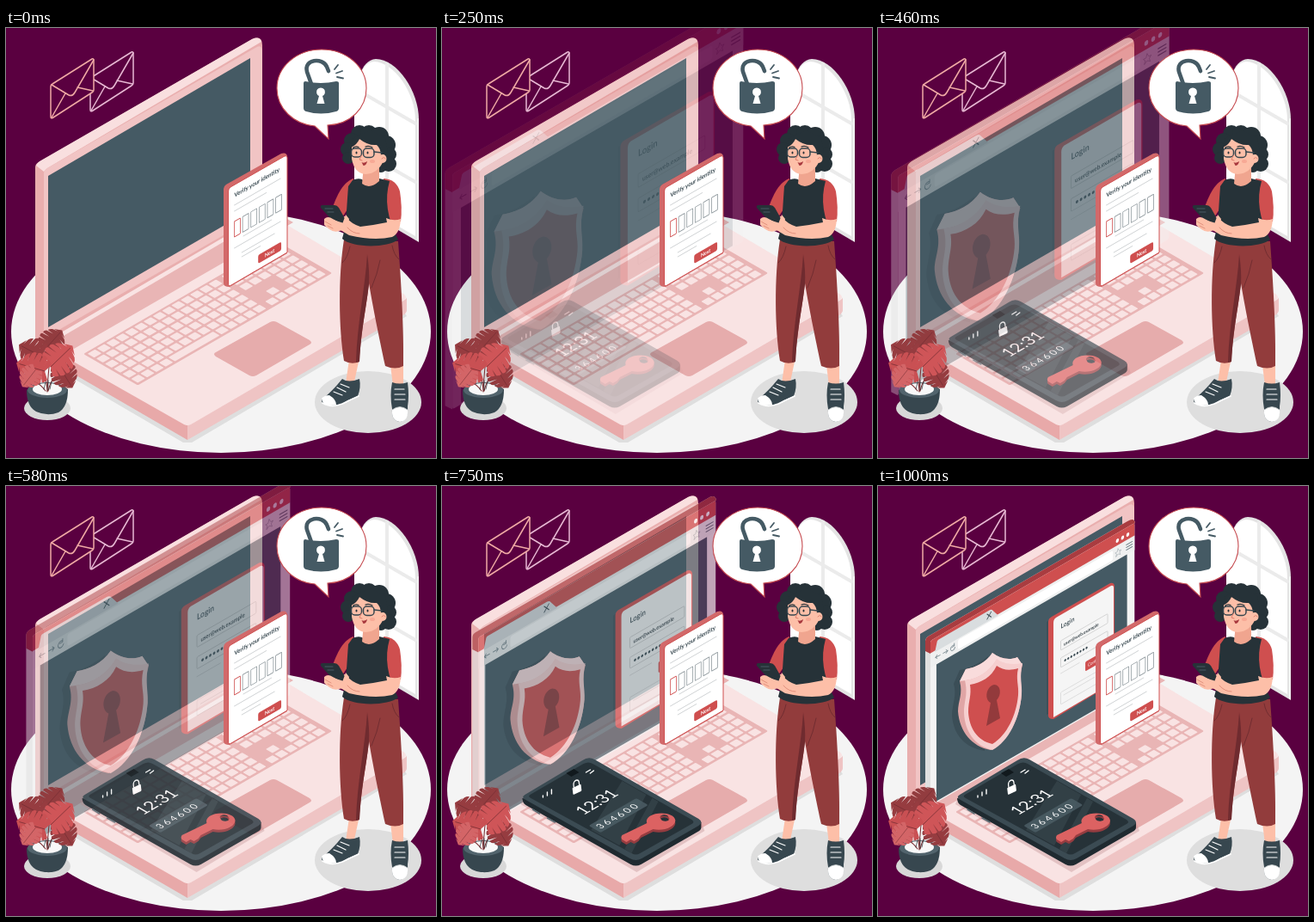
Recreate the animation shown at these times as an HTML page. Size 500 by 500 pixels, loop 1.04 s.

```html
<!DOCTYPE html>
<html lang="en">
<head>
<meta charset="utf-8">
<title>Verify your identity</title>
<style>
html, body { margin: 0; width: 100%; height: 100%; overflow: hidden; background: #5a0040; }
svg { display: block; width: 100%; height: 100%; }
text { font-family: "Lato", "Open Sans", sans-serif; }
</style>
</head>
<body>
<svg id="stage" viewBox="0 0 500 500"></svg>
<script>
const LOOP = 1040, STEP = 1000 / 24;
const DARK = '#263238', SLATE = '#455a64', STEEL = '#37474f', RED = '#cf4f4f', SKIN = '#fdbfa8';

const path = (d, fill, extra = '') => `<path d="${d}" fill="${fill}" ${extra}/>`;
const poly = (points, fill, extra = '') => `<polygon points="${points}" fill="${fill}" ${extra}/>`;
const line = (d, color, width = 1, extra = '') =>
  path(d, 'none', `stroke="${color}" stroke-width="${width}" stroke-linecap="round" stroke-linejoin="round" ${extra}`);
const oval = (x, y, rx, ry, fill, extra = '') =>
  `<ellipse cx="${x}" cy="${y}" rx="${rx}" ry="${ry}" fill="${fill}" ${extra}/>`;
const box = (x, y, w, h, r, fill, extra = '') =>
  `<rect x="${x}" y="${y}" width="${w}" height="${h}" rx="${r}" fill="${fill}" ${extra}/>`;
const label = (x, y, size, text, fill, extra = '') =>
  `<text x="${x}" y="${y}" font-size="${size}" fill="${fill}" ${extra}>${text}</text>`;

// Isometric planes: an upright wall and the flat table top.
const wall = (x, y, content) => `<g transform="matrix(.866 -.5 0 1 ${x} ${y})">${content}</g>`;
const flat = (x, y, content) => `<g transform="matrix(.866 -.5 .866 .5 ${x} ${y})">${content}</g>`;

function room() {
  return oval(250, 353, 244, 141, '#f4f4f4') +
    path('M405 205V105C405 66 412 37 430 36C455 36 480 74 480 106V249Z', '#e4e4e4') +
    path('M405 201V105C405 68 412 40 428 39C452 40 476 76 476 107V242Z', '#fff') +
    line('M443 42V226M405 70L476 111M405 138L476 179', '#ebebeb', 4, 'stroke-linecap="butt"') +
    line('M479 106V247', '#f2f2f2', 2) +
    oval(421, 435, 62, 36, '#dedede');
}

function envelopes() {
  const envelope = (x, y, color) => `<g transform="translate(${x} ${y})">` +
    line('M2 30L48 1Q50 0 50 3V37Q50 39 48 40L3 69Q0 71 0 68V33Q0 31 2 30Z', color, 1.5) +
    line('M1 31L21 43Q25 45 28 40L50 2M1 69L17 41M49 38L31 34', color, 1.5) + '</g>';
  return envelope(98, 27, '#e7b9d3') +
    path('M53 66L102 35V74L52 105Z', '#5a0040') + envelope(52, 35, '#f0aaa4');
}

function keyboard() {
  let keys = box(0, 0, 261, 73, 2, '#e9b5b5');
  for (let row = 0; row < 6; row++) {
    for (let col = 0; col < 20; col++) {
      if (row === 5 && col > 3 && col < 9) continue;
      if (row === 3 && col > 13 && col < 17) continue;
      if (row === 4 && (col === 14 || col === 16)) continue;
      keys += box(3 + col * 12.5 + (col > 13 ? 5 : 0), 2.5 + row * 11.7, 10, 9, 1, '#f9e3e3');
    }
  }
  return flat(90, 379, keys + box(53, 61, 60, 9, 1, '#f9e3e3'));
}

function laptop() {
  return poly('45,377 211,474 462,329 466,335 216,482 206,482 45,388', '#dedede') +
    path('M38 360L211 462V479L42 381Q36 377 38 360Z', '#e8a9a9') +
    path('M211 462L462 317Q466 315 466 313V328Q466 331 462 334L211 479Z', '#efc4c4') +
    path('M38 361L298 212L462 309Q468 313 462 317L215 461Q211 463 207 461L38 365Z', '#f9e3e3') +
    poly('60,362 79,373 334,226 312,214', '#e9b5b5') +
    path('M34 366V162Q34 158 38 156L286 13Q298 8 298 20V217L42 367Z', '#e9aeae') +
    path('M35 160Q36 157 39 155L286 13Q295 9 297 16L48 163L44 167Z', '#f9dfdf') +
    path('M44 169Q44 165 48 163L290 23Q298 18 298 28V215L44 361Z', '#f1c4c4') +
    poly('49,172 284,35 284,212 49,348', SLATE) +
    keyboard() +
    path('M244 377L307 342Q311 340 315 342L353 363Q357 366 353 368L291 404Q287 406 283 404L244 382Q240 379 244 377Z', '#e6acac');
}

function shield() {
  return path('M128 198C115 208 106 212 95 214L88 230C92 244 86 254 86 267C88 289 100 304 124 308Z', DARK, 'opacity=".3"') +
    path('M133 194C142 201 153 203 162 199L168 208C164 222 167 232 167 242C165 270 152 296 131 307C109 303 95 286 93 262C93 250 99 242 95 227L102 213C113 211 125 206 133 194Z', '#e0a5a5') +
    path('M133 194C142 201 153 203 162 199L168 208C156 211 147 208 138 202C130 215 118 224 102 226L95 227L102 213C113 211 125 206 133 194Z', '#f9dcdc') +
    path('M138 201C146 207 156 208 168 206C164 222 168 231 167 242C165 270 152 297 133 307C112 302 101 285 100 264C100 249 105 243 101 226C117 224 130 215 138 201Z', '#f6cfcf') +
    path('M138 209C145 214 153 215 163 212C160 225 164 232 163 243C161 266 150 290 133 300C115 296 106 281 105 263C105 249 109 244 107 231C120 229 132 222 138 209Z', RED) +
    path('M131 252L126 279L142 270L138 249C144 243 143 231 135 231C126 233 123 248 131 252Z', '#933a3c');
}

function loginPanel() {
  const field = y => box(0, y, 63, 11, 1, '#f5f5f5', 'stroke="#c9c9c9" stroke-width=".7"');
  let dots = '';
  for (let i = 0; i < 8; i++) dots += oval(6 + i * 4.1, 38.5, 1.3, 1.3, STEEL);
  return poly('196,158 272,113 272,222 196,266', DARK, 'opacity=".25"') +
    path('M198 158Q198 154 202 152L270 113Q275 112 275 117V228L204 271Q198 271 198 267Z', RED) +
    path('M204 159Q204 155 207 153L271 116Q274 115 274 118V228L204 269Z', '#f5f5f5') +
    wall(212.5, 167, label(0, -1, 7.7, 'Login', STEEL, 'font-weight="600"') +
      field(13) + label(4, 21, 5.5, 'user@web.example', DARK, 'font-weight="600"') + field(33) + dots +
      box(33, 54, 23, 11, 1.5, RED) + label(36.5, 61.5, 5.2, 'Confirm', '#fff') +
      box(0, 73, 63, 14, 1, 'none', 'stroke="#dadada" stroke-width=".8"') +
      line('M0 51H25M4 78H45', '#d4d4d4', .7));
}

function browser() {
  const icons = line('M0 3H6M0 3L2 1M0 3L2 5M10 3H16M16 3L14 1M16 3L14 5M25 1A3 3 0 1 0 26 4M25-1V2H22', '#75858c', .8);
  const dots = [251, 258, 265].map(x => oval(x, 9, 2, 2.2, '#fff')).join('');
  return path('M55 180Q55 177 58 175L290 41Q298 36 299 43L61 184V372L55 369Z', '#dfdfdf') +
    path('M55 180Q55 177 58 175L290 41Q298 36 299 43L61 195L55 192Z', '#a93c40') +
    wall(61, 180,
      box(0, 0, 274, 192, 2, '#f3f3f3') +
      box(0, 0, 274, 16, 2, RED) +
      box(0, 14.5, 274, 17, 0, '#eff0f0') +
      path('M6 16L9 5Q9.500 4 11 4H79Q82 4 84 7L91 16Z', '#d9dddf') +
      box(37, 17.5, 208, 11, 2, '#fff') +
      `<g transform="translate(7 20)">${icons}</g>` +
      line('M76 7L81.500 13M81.500 7L76 13', STEEL, .9) + dots +
      line('M263 20H271M263 23H271M263 26H271', '#65757d', 1) +
      line('M252 19L253.5 22H256L254 24L255 27L252 25L249 27L250 24L248 22H250.5Z', '#a4adb1', .6) +
      box(8, 31.5, 256, 159, 0, SLATE)) +
    shield() + loginPanel();
}

function phone() {
  const lock = box(-5, -3, 11, 8, 1, '#fff') + line('M-3-3V-6A3.2 3.2 0 0 1 4-6V-3', '#fff', 1.4);
  const key = (y, color) => `<g transform="translate(0 ${y})" fill="${color}" fill-rule="evenodd">` +
    '<path d="M237 391L208 405Q206 408 208 410L213 413L218 410L222 412L227 409L230 405L244 398' +
    'C256 401 270 395 270 388C269 379 250 377 240 383Q235 387 237 391Z' +
    'M253 386A5 3 0 1 0 262 384A5 3 0 1 0 253 386Z"/></g>';
  return poly('90,370 225,449 304,401 300,391 94,361', '#b98387', 'opacity=".35"') +
    path('M92 363L300 391V397Q300 400 296 402L230 440Q224 443 218 440L96 371Q92 368 92 363Z', '#1f2a30') +
    path('M95 359L162 319Q169 314 176 318L297 387Q303 391 297 395L231 433Q224 437 217 433L96 365Q90 362 95 359Z', '#3b4b53') +
    path('M101 359L163 323Q169 320 174 323L289 388Q293 391 289 393L229 427Q224 430 219 427L102 363Q98 361 101 359Z', DARK) +
    poly('208,343 236,359 205,418 172,400', '#53646c', 'opacity=".28"') +
    poly('243,363 250,367 219,427 211,422', '#53646c', 'opacity=".28"') +
    poly('143,334 152,329 158,333 149,338', '#11191d') +
    line('M116 362V360M121 360V356M126 358V353M166 333L171 330M171 334L175 331', '#fff', 1.4) +
    `<g transform="matrix(.9 -.42 .12 1 155 352)">${lock}</g>` +
    flat(163, 383, label(0, 0, 19, '12:31', '#fff')) +
    flat(183, 399, box(-4, -12, 64, 16, 2, '#4c5d66', 'opacity=".85"') +
      label(0, 0, 11, '364600', '#fff', 'letter-spacing="2.7"')) +
    key(4, '#963c40') + key(1, '#dc6262') +
    line('M104 376L112 381M121 386L130 391', '#566870', 1.5);
}

function verifyPanel() {
  let boxes = '';
  for (let i = 0; i < 6; i++) {
    boxes += box(i * 11.1, 30, 8, 18, .5, '#fff', `stroke="${i ? '#8d979c' : RED}" stroke-width=".9"`);
  }
  return path('M253 187Q253 184 256 182L320 146Q326 144 327 149V262L260 301Q253 301 253 297Z', '#d2696a') +
    path('M258.5 190Q258.5 187 261 185L323 149.500Q327 147.500 327 151V261L262 299Q258.5 301 258.5 297Z', '#fff', `stroke="${RED}" stroke-width="1"`) +
    wall(265.5, 195, label(0, 2, 7.1, 'Verify your identity', STEEL, 'font-weight="700"') +
      line('M0 11H62M0 18H43M12 53H50M0 61H62M10 71H54M10 76H35', '#cfd2d4', .9) + boxes +
      box(32, 85, 31, 10, 2, RED) + label(41, 92.3, 6, 'Next', '#fff', 'font-weight="700"'));
}

function bubble() {
  return path('M359 114L375 129L374 113C401 112 419 93 419 70C419 45 396 25 367 25C338 25 315 45 315 70C315 94 335 112 359 114Z', '#fff', 'stroke="#c64b50" stroke-width="1.1"') +
    line('M355 65L350 51C346 36 368 34 373 45L375 50', SLATE, 4.6) +
    path('M346 64Q346 62 348 62Q366 66 384 62Q387 62 387 64V93Q387 96 384 97Q366 102 349 97Q346 96 346 93Z', SLATE) +
    path('M364 79L361.5 88H370.5L368 79A5 5 0 1 0 364 79Z', '#fff') +
    line('M382 48L386 43M384 52.5L391 50M385 57L392 58.5', SLATE, 1.8);
}

function shoes() {
  return path('M399 386L395 413L404 416L410 388ZM447 392L450 416L462 416L462 391Z', SKIN) +
    path('M391 408Q398 413 411 408Q413 418 409 428L397 433Q388 440 377 439Q366 438 367 432Q378 424 391 408Z', STEEL) +
    path('M367 431Q370 427 376 427Q384 432 384 438Q368 441 367 431Z', '#fff') +
    line('M368 436Q378 442 391 437L410 428', '#fff', 1.8) +
    line('M381 423L391 427M385 418L395 423M389 414L399 418', '#fff', 1.2) +
    path('M449 412Q458 415 467 412Q469 428 467 440Q468 456 458 458Q448 457 449 443Q446 427 449 412Z', STEEL) +
    path('M449 444Q458 437 467 444Q468 457 458 458Q448 457 449 444Z', '#fff') +
    line('M452 420H463M452 426H464M452 432H464', '#fff', 1.2) +
    line('M449 444Q458 437 467 444', '#c9ced0', .8);
}

function head() {
  const curls = [[411, 123, 10], [422, 123, 10], [434, 126, 11], [442, 136, 11], [446, 147, 8],
    [445, 158, 9], [402, 131, 9], [397, 141, 8], [398, 151, 7], [436, 161, 7]];
  return curls.map(([x, y, r]) => oval(x, y, r, r, DARK)).join('') +
    path('M416 160L414 181Q423 188 434 178L434 158Z', '#f0a58f') +
    path('M402 138Q405 128 414 129L432 131Q442 142 439 154Q433 169 418 170Q405 169 402 152Z', SKIN) +
    path('M401 139Q408 136 411 129Q421 137 431 136Q436 140 436 149L444 145L441 128L423 119L404 128Z', DARK) +
    oval(438, 152, 4.5, 5, SKIN) + line('M437 152Q440 149 441 152', '#dd806f', .9) +
    oval(407.5, 145, 1, 1.5, DARK) + oval(420.5, 145, 1, 1.5, DARK) +
    line('M403.5 139.500Q406 137 410 138.500M418 138Q422 136.5 426 139', DARK, 1.3) +
    box(401.5, 140, 12, 10, 4, 'none', `stroke="${STEEL}" stroke-width="1.5"`) +
    box(415.5, 140, 12.5, 10.5, 4, 'none', `stroke="${STEEL}" stroke-width="1.5"`) +
    line('M428 144L437 145', STEEL, 1.5) +
    line('M413.500 148L411 153L414 154', '#de7e6d', 1) +
    path('M413.500 156Q416 158 420 155Q419 160 415.500 160Z', '#a8383d') +
    oval(426, 155, 3, 2, '#f59d8a', 'opacity=".65"');
}

function woman() {
  return shoes() +
    path('M393 246C386 290 387 350 393 387Q402 392 411 388C413 350 419 326 422 297C428 332 436 370 441 393Q453 398 462 393C463 350 459 290 456 248Z', '#923c3c') +
    path('M420 263Q423 283 422 298C418 330 413 350 411 388L407 389C408 345 418 300 420 263Z', '#6f2b2f') +
    line('M400 254Q397 268 391 273M449 253Q451 264 457 269M425 302Q432 286 435 270', '#712d31', 1) +
    path('M404 175C390 180 383 199 378 214L391 220L403 202Z', RED) +
    path('M439 175Q454 176 458 190Q461 209 459 225L441 224Z', RED) +
    path('M403 177Q409 174 414 176Q422 184 434 175L446 178C440 199 443 221 456 246C444 256 402 256 391 245C396 229 396 209 398 184Z', DARK) +
    head() +
    path('M442 221Q451 225 459 222Q458 239 449 243Q428 248 399 241L389 235Q383 239 376 234L371 230L374 222L394 219Q402 228 412 231Q429 229 443 226Z', SKIN) +
    path('M368 206L382 206Q385 206 387 209L396 225Q396 228 393 227L380 223Q377 222 375 219L366 209Q365 206 368 206Z', DARK) +
    line('M371 210L380 210M374 214L381 214', '#52646d', .8) +
    path('M370 222Q374 218 380 222L391 228L395 217L399 222L397 233Q386 239 377 234L370 229Z', SKIN) +
    line('M371 225L378 229M374 230L380 233M397 232Q403 239 411 239', '#df8c79', .9);
}

// Heart-shaped leaf whose two halves are split into lobes by thin notches.
function leaf(x, y, angle, size, fill) {
  const reach = t => 19 * Math.sin(Math.PI * (.12 + .88 * t)) ** .7;
  const at = (side, t, share = 1) => `${(side * share * reach(t)).toFixed(1)} ${(6 - 42 * t).toFixed(1)}`;
  const half = side => {
    let d = 'M0 0';
    for (let t = 0; t < .7; t += .17) {
      d += `L${at(side, t)}Q${at(side, t + .07, 1.12)} ${at(side, t + .13)}L${at(side, t + .2, .4)}`;
    }
    return d + `L${at(side, .85)}L0-36Z`;
  };
  return `<g transform="translate(${x} ${y}) rotate(${angle}) scale(${size})">` +
    path(half(-1) + half(1), fill) + line('M0 0V-32', '#702b31', .7) + '</g>';
}

function plant() {
  return oval(48, 442, 27, 14, '#d8d8d8') +
    path('M24 421Q48 406 72 420Q72 441 61 447Q48 452 35 446Q24 440 24 421Z', STEEL) +
    oval(48, 421, 23, 9, '#52646d') + oval(48, 420, 17, 7, '#f8f8f8') +
    line('M48 423Q47 400 38 392M48 423Q49 395 53 375M49 422Q53 405 64 401M46 422Q40 414 33 411', '#7f3034', 1.1) +
    leaf(46, 373, 42, .8, '#923c3f') +
    leaf(43, 383, -62, .88, '#963c40') +
    leaf(62, 394, 148, .8, '#963c40') +
    leaf(52, 394, 46, .98, '#cf5558') +
    leaf(45, 399, -74, .95, '#c95053') +
    leaf(34, 398, -142, .68, '#d36567') +
    line('M46 412L44 420M49 410V421M53 411L51 420', DARK, .7);
}

document.getElementById('stage').innerHTML =
  '<rect width="500" height="500" fill="#5a0040"/>' +
  room() + envelopes() + laptop() +
  `<g id="browser">${browser()}</g>` +
  `<g id="phone">${phone()}</g>` +
  verifyPanel() + bubble() + woman() + plant();

const browserGroup = document.getElementById('browser');
const phoneGroup = document.getElementById('phone');

// Cubic Bézier easing solved by bisection.
function bezier(x, x1, y1, x2, y2) {
  const at = (s, a, b) => 3 * (1 - s) ** 2 * s * a + 3 * (1 - s) * s * s * b + s ** 3;
  let low = 0, high = 1;
  for (let i = 0; i < 24; i++) {
    const mid = (low + high) / 2;
    if (at(mid, x1, x2) < x) low = mid; else high = mid;
  }
  return at(low, y1, y2);
}

function render(time) {
  const progress = Math.min(1, Math.floor((time % LOOP + 5) / STEP) / 24);
  const zoom = progress ** 1.37;
  const slide = bezier(progress, .36, -.01, .5, 1.38);
  browserGroup.setAttribute('opacity', zoom);
  browserGroup.setAttribute('transform', `translate(176 204) scale(${1.5 - zoom / 2}) translate(-176 -204)`);
  phoneGroup.setAttribute('opacity', Math.max(0, Math.min(1, slide)));
  phoneGroup.setAttribute('transform', `translate(${30 * (slide - 1)} 0)`);
}

const start = performance.now();
function tick() {
  render(performance.now() - start);
  requestAnimationFrame(tick);
}
tick();
</script>
</body>
</html>
```
